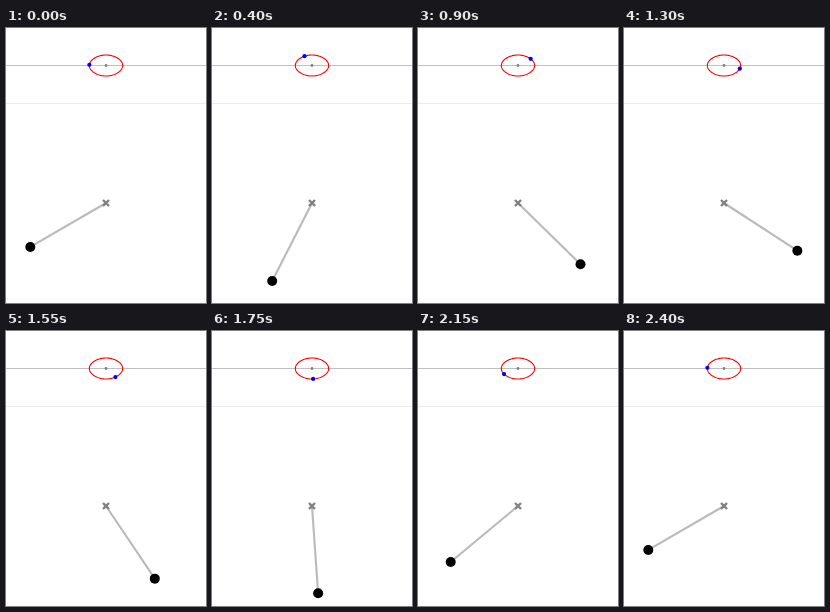
An HTML page for the animation above (2450 ms loop, 200 px wide and 275 px high).

```html
<!DOCTYPE html>
<html lang="en">
<head>
<meta charset="utf-8">
<title>Pendulum and phase portrait</title>
<style>
  html, body { margin: 0; width: 100%; height: 100%; overflow: hidden; background: #fff; }
  svg { display: block; width: 100vw; height: 100vh; }
</style>
</head>
<body>
<svg viewBox="0 0 200 275">
  <path d="M0 37.5H200" stroke="#bfbfbf"/>
  <path d="M0 75.5H200" stroke="#ebebeb"/>
  <circle cx="100" cy="37.5" r="1.4" fill="#808080"/>
  <path id="orbit" fill="none" stroke="#f00" stroke-width="1.1"/>
  <circle id="state" r="2.1" fill="#00f"/>
  <line id="rod" x1="100" y1="175" stroke="#bababa" stroke-width="2.1"/>
  <path d="M97 172l6 6m0-6l-6 6" stroke="#808080" stroke-width="2.4"/>
  <circle id="bob" r="5" fill="#000"/>
</svg>
<script>
const LOOP = 2450, STEP = 50, PERIOD = 48;
const AMP = Math.PI / 3, LENGTH = 87.5;
// a 60 degree swing lasts 1.07318 times the small-angle period
const RATE = 2 * Math.PI * 1.07318 / PERIOD;
const $ = id => document.getElementById(id);
const set = (el, attrs) => {
  for (const k in attrs) el.setAttribute(k, attrs[k].toFixed(3));
};

const phase = (angle, speed) => ({
  x: 100 + angle * 200 / (4 * Math.PI),
  y: 37.5 - speed * 10.5
});

// leapfrog integration of angle'' = -sin(angle), released from rest
function swing(time) {
  const n = 400, dt = time / n;
  let angle = -AMP, speed = 0;
  for (let i = 0; i < n; i++) {
    speed -= Math.sin(angle) * dt / 2;
    angle += speed * dt;
    speed -= Math.sin(angle) * dt / 2;
  }
  return { angle, speed };
}

const poses = Array.from({ length: PERIOD }, (_, i) => swing((i + 0.5) * RATE));

// closed curve of constant energy
const curve = Array.from({ length: 90 }, (_, i) => {
  const a = i * Math.PI / 45;
  const p = phase(2 * Math.asin(Math.sin(AMP / 2) * Math.sin(a)), Math.cos(a));
  return p.x.toFixed(2) + ' ' + p.y.toFixed(2);
});
$('orbit').setAttribute('d', 'M' + curve.join('L') + 'Z');

function draw(ms) {
  const { angle, speed } = poses[Math.floor(ms % LOOP / STEP) % PERIOD];
  const x = 100 + LENGTH * Math.sin(angle);
  const y = 175 + LENGTH * Math.cos(angle);
  const p = phase(angle, speed);
  set($('rod'), { x2: x, y2: y });
  set($('bob'), { cx: x, cy: y });
  set($('state'), { cx: p.x, cy: p.y });
}

const start = performance.now();
function tick() {
  draw(performance.now() - start);
  requestAnimationFrame(tick);
}
tick();
</script>
</body>
</html>
```
